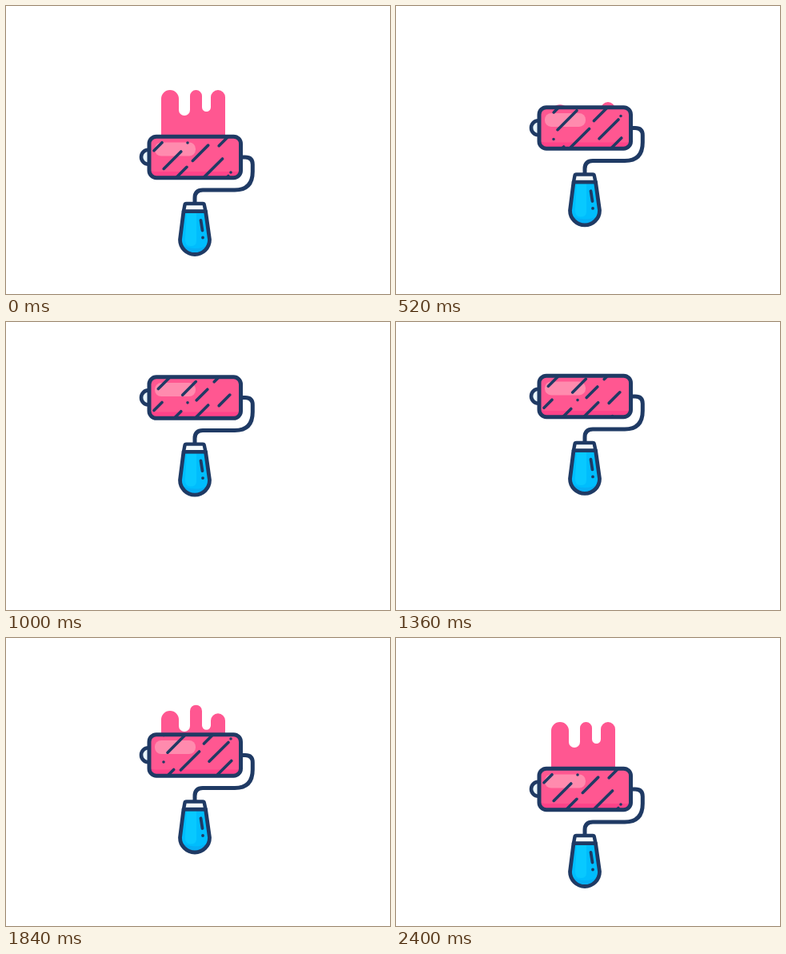
An HTML page for the animation above (2440 ms loop, 480 by 360 pixels).

```html
<!DOCTYPE html>
<html lang="en">
<head>
<meta charset="utf-8">
<title>Paint roller</title>
<style>
  html, body { margin: 0; width: 100%; height: 100%; overflow: hidden; background: #fff; }
  svg { display: block; }
  .ink { stroke: #1f3a64; stroke-linecap: round; stroke-linejoin: round; }
</style>
</head>
<body>
<svg width="480" height="360" viewBox="0 0 480 360">
  <defs>
    <rect id="barrel" x="179" y="163.2" width="114.5" height="51.5" rx="9"/>
    <path id="handle" d="M222 256.500H249.500L254.500 292A18.5 18.5 0 0 1 217.500 292Z"/>
    <clipPath id="sleeve"><use href="#barrel"/></clipPath>
    <clipPath id="grip"><use href="#handle"/></clipPath>
    <clipPath id="above"><rect id="mask" width="480"/></clipPath>
  </defs>

  <g clip-path="url(#above)"><path id="paint" fill="#ff5791"/></g>

  <g id="roller">
    <path class="ink" fill="#e8f6fc" stroke-width="4.6" d="M178 179.800a9 9 0 0 0 0 18"/>
    <path class="ink" fill="none" stroke-width="5" d="M295 189H299Q308.300 189 308.300 198V207Q308.300 230 286 230H246Q236 230 236 240V247"/>

    <g clip-path="url(#sleeve)">
      <path fill="#ff5791" d="M179 162H295V216H179Z"/>
      <path fill="#ff4389" d="M179 204Q181 207 187 207H295V216H179Z"/>
      <rect x="186" y="170.500" width="51" height="17" rx="8" fill="#ff8bae"/>
      <g id="texture" class="ink" fill="none" stroke-width="3.6">
        <g id="tile">
          <path id="stripes"/>
          <path d="M227 171h.01M281 208h.01M197 237h.01"/>
        </g>
        <use href="#tile" y="112"/>
      </g>
    </g>
    <use href="#barrel" class="ink" fill="none" stroke-width="5"/>

    <g clip-path="url(#grip)">
      <path fill="#00bdfd" d="M210 250H260V315H210Z"/>
      <path fill="#08c9ff" d="M226 257H238V294Q238 300 231 300Q223 300 224 290Z"/>
      <path fill="#06aff5" d="M215 296Q236 310 258 296V315H215Z"/>
    </g>
    <use href="#handle" class="ink" fill="none" stroke-width="4.8"/>
    <path class="ink" fill="#f5fafc" stroke-width="4.4" d="M222 256.500L223.500 248.500Q223.800 247 225.500 247H246Q247.500 247 247.800 248.500L249.500 256.500Z"/>
    <path class="ink" fill="none" stroke-width="3.8" d="M243.500 267.800L245.500 280.500M246 289.500h.01"/>
  </g>
</svg>
<script>
const LOOP = 2440, TRAVEL = 2400, RISE = 99, SPIN = 0.93;
const $ = id => document.getElementById(id);

// Diagonal strokes step down the sleeve, alternating right and left.
function stripePath() {
  const centres = [273, 190, 243, 208, 259, 214, 266, 230, 271, 200, 229, 245];
  return centres.map((x, i) => {
    const y = 168 + 9.4 * i - 3.5 * Math.sin(i * Math.PI / 6);
    const run = Math.min(12 + 12 * Math.sin((i + 0.5) * Math.PI / 12), x - 180);
    return `M${x - run / 2} ${y + run / 2}l${run} ${-run}`;
  }).join('');
}

// Rounded fingers and gaps alternate from left to right, each sinking at its own pace.
function paintPath(t) {
  const widths = [22, 14, 15, 11, 18];
  const edge = widths.map((width, i) => {
    const r = width / 2, finger = i % 2 === 0;
    const speed = 0.025 + 0.0135 * Math.sin(0.9 * i) + (t > 0 ? 0.01 : 0);
    const tip = (finger ? 105 : 139.5 - 2.5 * i) + t * speed;
    return `V${tip + (finger ? r : -r)}a${r} ${r} 0 0 ${+finger} ${width} 0`;
  });
  return `M194 400${edge.join('')}V400Z`;
}

const ease = p => p < 0.5 ? (2 * p) ** 2.15 / 2 : 1 - (2 - 2 * p) ** 2.15 / 2;

function draw(now) {
  const t = Math.min(now % LOOP, TRAVEL);
  const half = TRAVEL / 2;
  const lift = RISE * ease(1 - Math.abs(t - half) / half);
  $('roller').setAttribute('transform', `translate(0 ${-lift})`);
  $('texture').setAttribute('transform', `translate(0 ${-lift * SPIN})`);
  $('mask').setAttribute('height', 189 - lift);
  $('paint').setAttribute('d', paintPath(t < half ? t : t - TRAVEL));
}

$('stripes').setAttribute('d', stripePath());
const start = performance.now();
function tick() {
  draw(performance.now() - start);
  requestAnimationFrame(tick);
}
tick();
</script>
</body>
</html>
```
